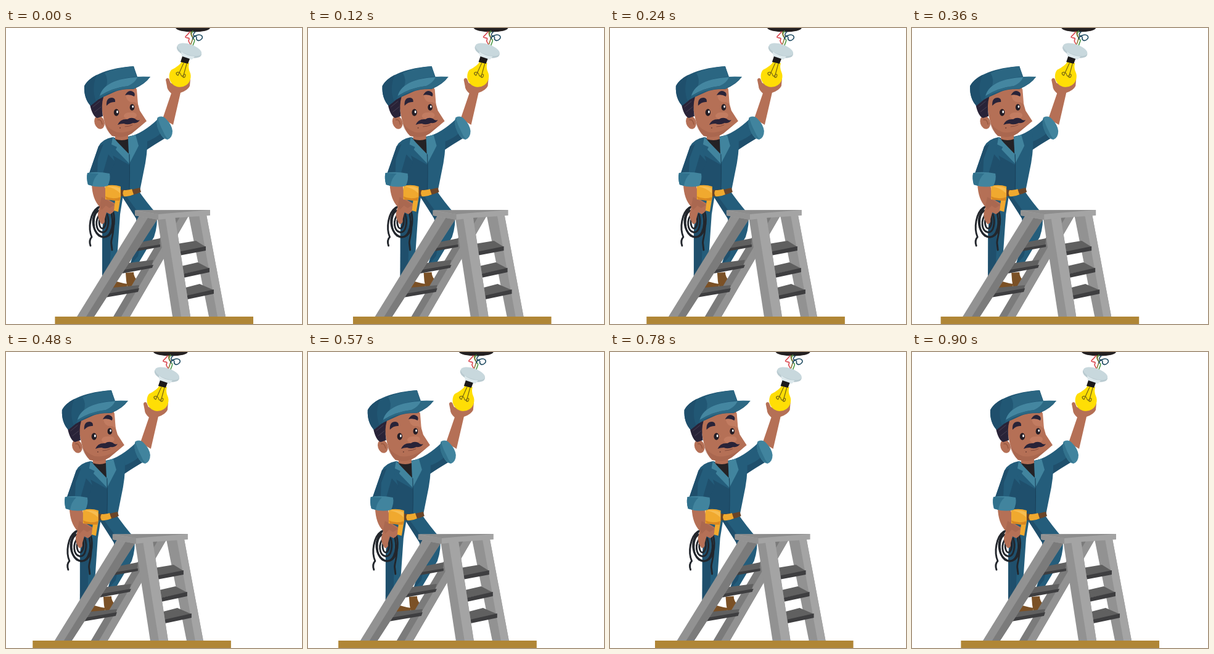
Write an HTML page that moves like this. It is 480 px wide and 480 px high and loops after 930 ms.

```html
<!DOCTYPE html>
<html lang="en">
<head>
<meta charset="utf-8">
<title>Electrician on a ladder</title>
<style>
  html, body { margin: 0; width: 100%; height: 100%; overflow: hidden; background: #fff; }
  svg { display: block; width: 100%; height: 100%; }
  .line { fill: none; stroke-linecap: round; stroke-linejoin: round; }
  .skin { fill: #b57056; }
  .shade { fill: #9f5f49; }
  .blue { fill: #245d7b; }
  .navy { fill: #1f4f6c; }
  .light { fill: #41849e; }
  .hair { fill: #292338; }
  .gold { fill: #f0a92f; }
  .shoe { fill: #7b5126; }
  .beam { fill: #a4a4a4; }
  .mid { fill: #929292; }
  .dim { fill: #7b7b7b; }
  .step { fill: #606060; }
  .edge { fill: #3e3e40; }
</style>
</head>
<body>
<svg viewBox="0 0 480 480">
  <g id="scene">
    <path fill="#b08636" d="M79.4 468H401V480H79.4Z"/>

    <g id="lamp">
      <path fill="#231f20" d="M275 0Q279 6 304 6.500Q328 6 331 0Z"/>
      <g class="line" stroke-width="1.6">
        <path stroke="#d9434b" d="M298 6C296 11 290 13 291 15C293 17 298 15 297 18L296 21L299 27"/>
        <path stroke="#4d9a49" d="M303 5C299 11 300 13 304 17C308 21 304 23 303 29"/>
        <path stroke="#8f7a37" d="M300 6C298 11 304 13 303 17L300 26"/>
        <path stroke="#1f4b62" d="M307 6C301 12 305 14 309 12C316 9 321 14 317 18C312 23 308 19 309 16C309 12 303 13 303 18"/>
      </g>
      <ellipse cx="297" cy="37" rx="21" ry="10" transform="rotate(19 297 37)" fill="#b9cad0"/>
      <ellipse cx="297.500" cy="35" rx="20.500" ry="8.500" transform="rotate(19 297.500 35)" fill="#c8d8dd"/>
      <path fill="#dce8ec" d="M284 38Q292 45 306 46L302 51Q291 51 285 46Z"/>
    </g>

    <g id="raised-arm">
      <path class="skin" d="M254 147L268 106Q261 100 261 94L259 84Q260 80 264 82L267 89L279 94L293 91L296 80Q299 78 299 83L298 94Q295 101 283 105L271 157Z"/>
      <path fill="#ffde05" d="M285 54L297 57Q295 64 298 71A17.500 17.500 0 1 1 268 68Q282 61 285 54Z"/>
      <path class="line" stroke="#766513" stroke-width="1.200" d="M288 57L279 77Q276 76 276 73Q280 70 283 74Q284 79 287 78Q288 73 291 76Q291 81 287 80L293 58"/>
      <path fill="#1b191b" d="M286 46L298 50L295 58L283 55Z"/>
      <path class="skin" d="M265 90Q272 97 282 97Q291 97 297 89L296 96Q285 105 271 101Z"/>
      <path class="blue" d="M200 176Q222 171 247 147L259 178Q242 187 226 199Z"/>
      <path class="navy" d="M226 185Q243 179 253 169L259 178Q241 189 227 198Z"/>
      <path class="light" d="M246 145Q254 141 260 148Q269 157 270 167Q270 178 262 181Q254 180 249 169Q242 155 246 145Z"/>
      <path fill="#32728d" d="M246 145Q249 157 254 166Q257 174 262 180Q253 178 248 167Q242 154 246 145Z"/>
    </g>

    <g id="legs">
      <path class="blue" d="M186 267L213 261Q228 283 244 301Q247 318 240 339L212 386L198 393L216 337L211 309Z"/>
      <path class="navy" d="M186 270L196 274L226 315L214 370L202 384L216 337L211 309Z"/>
      <path class="blue" d="M162 264L190 271L185 302L181 360L174 410L156 402L156 330Z"/>
      <path class="navy" d="M157 310L169 290L170 350L168 403L156 402Z"/>
      <path class="shoe" d="M194 397L207 396Q207 404 214 410L215 419L197 421L195 410Z"/>
      <path class="shoe" d="M174 409Q184 413 197 415L196 420L170 424Z"/>
    </g>

    <g id="torso">
      <path class="blue" d="M174 177Q187 184 198 176L228 170Q231 190 226 219L217 264Q190 270 162 258L168 220L152 190Z"/>
      <path class="navy" d="M170 205L200 222V266Q179 265 162 257Z"/>
      <path class="skin" d="M177 170H198V181L190 188L177 181Z"/>
      <path fill="#242225" d="M177 180Q188 184 198 180L199 204Q185 193 177 180Z"/>
      <path class="light" d="M173 177L199 204L200 220L178 197L180 193L165 186Z"/>
      <path class="light" d="M198 177L210 173L215 191L212 197L200 220Z"/>
      <path class="line" stroke="#193f59" d="M200 205Q201 235 200 261"/>
      <path class="blue" d="M173 177Q156 180 150 192L135 235L167 238L176 216L170 195Z"/>
      <path class="navy" d="M150 192L158 188L149 212L148 236H135Z"/>
      <path class="navy" d="M166 205L177 217L167 238L157 236Z"/>
    </g>

    <g id="belt">
      <path fill="#6b4528" d="M185 262Q201 264 217 259L219 266Q204 273 185 273Z"/>
      <path class="gold" d="M191 263Q199 263 204 261L207 270Q199 274 191 273Q188 267 191 263Z"/>
    </g>

    <g id="low-arm">
      <g class="line" stroke="#22262c" stroke-width="2.900">
        <path d="M149 291C136 300 133 325 139 339Q134 344 137 353"/>
        <path d="M150 296C139 304 140 329 151 337C168 346 176 324 171 301"/>
        <path d="M153 301C143 312 146 329 155 331C166 334 168 313 164 302"/>
        <path d="M151 290C134 309 141 334 157 339C174 340 179 315 173 295"/>
        <path d="M154 305C148 316 153 326 157 325C163 321 162 311 161 303"/>
        <path d="M174 314C176 334 169 344 171 351L172 360"/>
      </g>
      <path class="skin" d="M139 253L160 255L164 277L179 286Q178 297 169 302L163 299L160 310Q161 318 155 318Q149 311 149 301L152 290Q140 278 139 253Z"/>
      <path class="shade" d="M155 274L164 279L176 287L168 292L162 288L155 295L152 288Z" opacity=".5"/>
      <path class="gold" d="M161 256Q174 253 186 257L186 274L182 298L175 296L177 279L161 278Z"/>
      <path fill="#d98821" d="M161 273Q173 279 186 274L184 280H176L163 278Z"/>
      <path fill="#f7bd51" d="M163 257Q178 256 185 260L185 268Q178 260 163 257Z"/>
      <path class="light" d="M132 235Q148 232 168 236Q170 245 165 256Q149 260 133 254Q130 244 132 235Z"/>
      <path fill="#30718d" d="M132 235L150 236Q142 243 140 256L133 254Q130 244 132 235Z"/>
    </g>

    <g id="head">
      <ellipse class="skin" cx="151.500" cy="153" rx="8" ry="11" transform="rotate(-18 151.500 153)"/>
      <path class="line" stroke="#98583f" stroke-width="1.500" d="M149 149Q154 147 156 156"/>
      <path class="skin" d="M153 100L210 84L213 120L217 134L228 151L204 171Q190 180 172 175Q155 160 153 100Z"/>
      <path fill="#c27c61" d="M194 107L212 99L214 124L208 120Q195 122 194 107Z"/>
      <path class="shade" d="M158 148Q163 163 180 169Q199 172 223 155L204 171Q190 180 172 175Q160 164 158 148Z" opacity=".5"/>
      <path class="hair" d="M136 124L151 108L158 112Q154 125 157 143L148 146Q140 143 136 124Z"/>
      <path class="line" stroke="#484052" d="M141 128L152 119M144 136L154 128"/>

      <path class="hair" d="M163 126Q162 113 172 113Q178 114 177 120Q169 119 163 126Z"/>
      <path class="hair" d="M193 109Q199 98 207 104Q210 107 208 111Q201 107 193 109Z"/>
      <g fill="#241d25">
        <ellipse cx="179" cy="137" rx="4.200" ry="5.700"/>
        <ellipse cx="204.500" cy="128.500" rx="3.800" ry="5.300"/>
      </g>
      <g fill="#fff">
        <ellipse cx="180.500" cy="136" rx="1.400" ry="2.200"/>
        <ellipse cx="205.700" cy="127.500" rx="1.300" ry="2.100"/>
      </g>
      <path fill="#c27c61" d="M191 142Q193 137 200 137Q210 135 212 141Q212 146 205 147Q191 149 191 142Z"/>
      <path class="hair" d="M181 157Q185 147 197 148Q202 144 209 147Q213 151 217 149Q214 155 206 154Q198 158 191 155Q186 155 181 157Z"/>
      <path class="line" stroke="#8a4d3d" d="M193 160Q200 160 205 157"/>
      <circle cx="185" cy="162" r="1" fill="#704135"/>

      <path fill="#215774" d="M137 126Q126 114 127 94C136 76 170 64 207 62L213 79L193 96L151 115Z"/>
      <path class="navy" d="M127 94Q133 83 147 76Q138 98 146 119L137 126Q126 114 127 94Z"/>
      <path fill="#2b6682" d="M160 73Q180 64 207 62L212 79Q182 81 162 96Q167 83 160 73Z"/>
      <path class="blue" d="M150 116Q153 97 174 87Q198 77 234 79Q226 91 207 99Q175 98 150 116Z"/>
      <path fill="#4486a0" d="M152 110Q156 95 175 87Q194 79 234 79Q217 87 198 94Q172 97 152 110Z"/>
      <path fill="#2d6984" d="M198 94Q210 88 213 80L234 79Q225 90 207 98Q178 97 152 112Q170 97 198 94Z"/>
    </g>

    <g id="ladder">
      <path class="dim" d="M272 303H297L201 468H174Z"/>
      <path class="mid" d="M284 303H297L201 468H187Z"/>
      <path class="step" d="M215 348L250 341L249 353L207 361Z"/>
      <path class="edge" d="M208 358L250 351V355L206 363Z"/>
      <path class="step" d="M199 381L239 376L236 386L185 396Z"/>
      <path class="edge" d="M186 393L239 384L237 389L183 399Z"/>
      <path class="step" d="M173 421L216 417L214 426L163 433Z"/>
      <path class="edge" d="M164 431L216 422L214 428L161 437Z"/>
      <path class="mid" d="M217 303H250L143 468H115Z"/>
      <path class="dim" d="M233 303H250L143 468H130Z"/>

      <path class="mid" d="M296 303H325L356 468H329Z"/>
      <path class="beam" d="M313 303H325L356 468H343Z"/>
      <path class="step" d="M278 350L308 345L324 355L281 364Z"/>
      <path class="edge" d="M280 363L324 354V361L281 369Z"/>
      <path class="step" d="M285 386L311 380L330 390L287 399Z"/>
      <path class="edge" d="M286 399L330 389V396L288 405Z"/>
      <path class="step" d="M291 421L314 415L337 425L293 435Z"/>
      <path class="edge" d="M293 434L337 424V431L294 440Z"/>
      <path class="mid" d="M245 305H274L299 468H270Z"/>
      <path class="beam" d="M258 306H274L299 468H284Z"/>
      <path class="beam" d="M209 295.500L331 295V304L272 308L247 311L209 304Z"/>
      <path fill="#8d8d8d" d="M209 295.500L331 295L269 300L247 302Z"/>
      <path class="mid" d="M209 296L247 302L247 311L209 304Z"/>
    </g>
  </g>
</svg>
<script>
  const scene = document.getElementById("scene");
  const LOOP = 930, TICK = 30, HALF = 450, REACH = 36.6;

  // Smooth sway left and back, held for one tick at a time.
  function sway(time) {
    const t = Math.floor(time % LOOP / TICK) * TICK;
    const u = 1 - Math.abs(1 - t / HALF);
    return -REACH * u * u * (3 - 2 * u);
  }

  function draw() {
    scene.setAttribute("transform", `translate(${sway(performance.now()).toFixed(2)} 0)`);
    requestAnimationFrame(draw);
  }
  draw();
</script>
</body>
</html>
```
